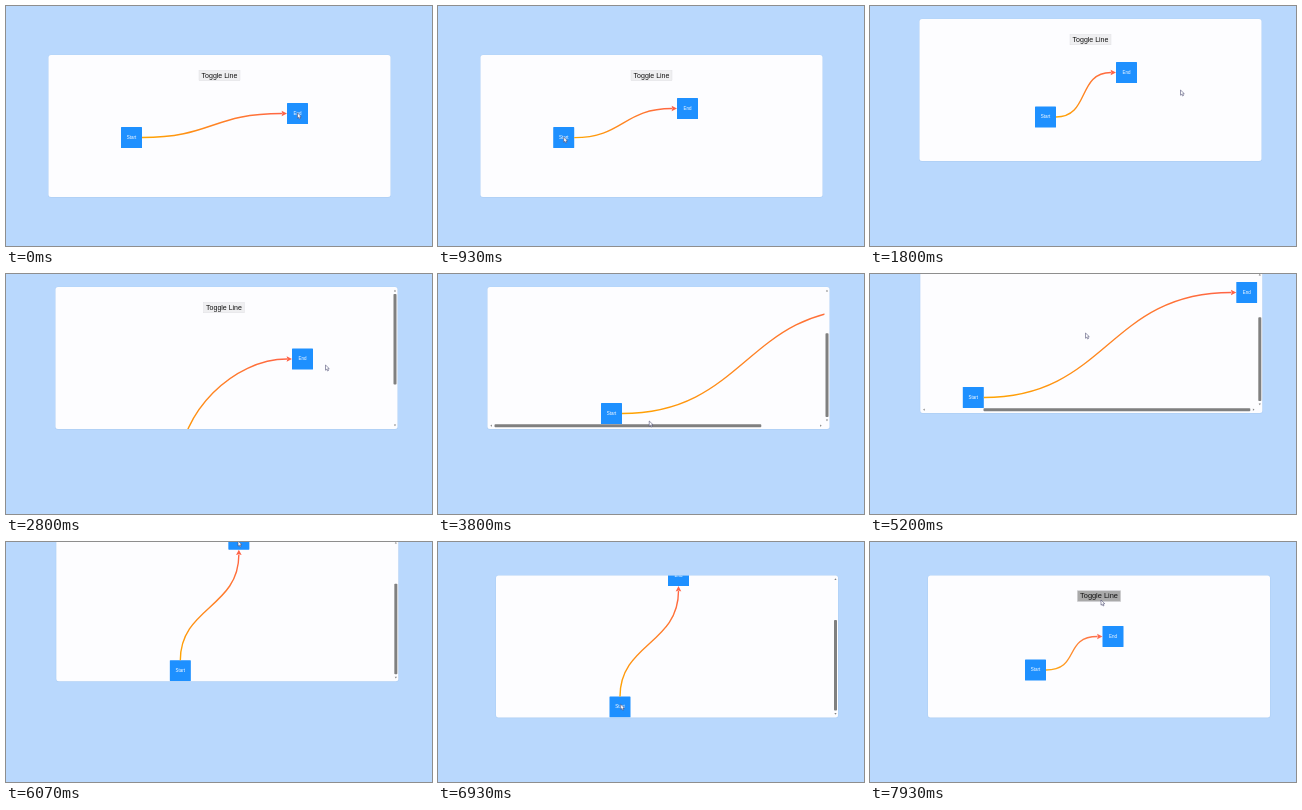
Animation of 426x240 px, one loop 8 s. Source, as an HTML page:

```html
<!DOCTYPE html>
<html lang="en">
<head>
<meta charset="utf-8">
<title>Toggle Line</title>
<style>
  html, body { margin: 0; width: 100%; height: 100%; overflow: hidden; background: #b9d8fd; }
  #stage { display: block; width: 100vw; height: 100vh; }
  text { font-family: "Liberation Sans", Arial, sans-serif; text-anchor: middle; }
  .label { font-size: 4.5px; fill: #fff; }
  .box { fill: #1e90ff; }
  .bar { fill: #808080; }
</style>
</head>
<body>
<svg id="stage" viewBox="0 0 426 240">
  <defs>
    <linearGradient id="fade" gradientUnits="userSpaceOnUse">
      <stop offset="0" stop-color="#ffa500"/>
      <stop offset="1" stop-color="#ff6347"/>
    </linearGradient>
  </defs>
  <g id="panel">
    <rect x="-.5" y="-.3" width="343" height="143" rx="3" fill="#a4c5ec" opacity=".5"/>
    <rect width="342" height="142" rx="2.5" fill="#fdfdff"/>
    <svg id="view">
      <g id="content">
        <g id="button">
          <rect x="-20.5" y="-5.2" width="41" height="10.4" stroke="#dcdce0" stroke-width=".4"/>
          <text y="2.2" font-size="7" fill="#111">Toggle Line</text>
        </g>
        <g id="start"><rect class="box" width="21" height="21" rx=".6"/><text class="label" x="10.5" y="11.8">Start</text></g>
        <g id="end"><rect class="box" width="21" height="21" rx=".6"/><text class="label" x="10.5" y="11.8">End</text></g>
        <g id="line">
          <path id="curve" fill="none" stroke="url(#fade)" stroke-width="1.4"/>
          <path id="arrow" d="M0 0L-5.4 -2.8L-4.6 0L-5.4 2.8Z" fill="#ff6347"/>
        </g>
      </g>
    </svg>
    <g id="vbar">
      <rect class="bar" x="338" width="3" rx=".8"/>
      <path class="bar" d="M338.4 4.4h2.2l-1.1-1.6z"/>
      <path class="bar tail" d="M338.4 -4.4h2.2l-1.1 1.6z"/>
    </g>
    <g id="hbar">
      <rect class="bar" y="137.2" height="3" rx=".8"/>
      <path class="bar" d="M4.4 137.6v2.2l-1.6-1.1z"/>
      <path class="bar tail" d="M-4.4 137.6v2.2l1.6-1.1z"/>
    </g>
  </g>
  <path id="cursor" d="M0 0V5.2L1.2 4.2L2 6L3 5.5L2.2 3.8L3.8 3.7Z" fill="#fff" stroke="#45456c" stroke-width=".55"/>
</svg>
<script>
const LOOP = 8000, FPS = 15, W = 342, H = 142, BAR = 5, SIZE = 21, HALF = SIZE / 2, ARROW = 5;
const $ = id => document.getElementById(id);

const initial = {
  panel: [42.5, 49], start: [72.5, 72], end: [238.5, 48],
  scrollX: [0], scrollY: [0], opacity: [1]
};

// Time, duration, what changes, and where it goes; "rest" only parks the pointer.
const script = [
  [0, 600, "end", 196.5, 43],
  [850, 400, "start", 115.5, 87.5],
  [1300, 400, "panel", 49.5, 13],
  [1800, 0, "rest", 310.5, 84],
  [1950, 300, "start", 113.5, 180],
  [2400, 250, "end", 236.5, 61.5],
  [2800, 0, "rest", 319.5, 91],
  [2900, 300, "end", 387, 75],
  [3350, 200, "scrollY", 1],
  [3800, 400, "scrollX", 1],
  [4400, 500, "panel", 50.3, -3],
  [5200, 0, "rest", 215.5, 59],
  [5450, 550, "end", 172, 48.5],
  [6050, 400, "panel", 58, 33.5],
  [6930, 400, "start", 97, 84],
  [7400, 150, "end", 174.5, 50.5],
  [7750, 0, "rest", 231, 58],
  [7830, 170, "opacity", .5]
].map(([at, span, what, ...to]) => ({ at, until: at + span, what, to }));
const pointing = script.filter(step => !["panel", "opacity"].includes(step.what));

function mix(a, b, k) {
  k = Math.min(1, Math.max(0, k));
  const ease = k * k * (3 - 2 * k);
  return a.map((v, i) => v + (b[i] - v) * ease);
}

function layout(t) {
  const s = { ...initial };
  for (const { at, until, what, to } of script)
    if (t > at && what in s) s[what] = mix(s[what], to, (t - at) / (until - at));
  s.fullW = Math.max(s.start[0], s.end[0]) + SIZE;
  s.fullH = Math.max(s.start[1], s.end[1]) + SIZE;
  const wide = s.fullW > W || (s.fullH > H && s.fullW > W - BAR);
  s.viewH = wide ? H - BAR : H;
  s.viewW = s.fullH > s.viewH ? W - BAR : W;
  s.x = s.scrollX[0] * Math.max(0, s.fullW - s.viewW);
  s.y = s.scrollY[0] * Math.max(0, s.fullH - s.viewH);
  return s;
}

const alongBar = (view, full, offset) => 7 + (view - 14) * offset / full;

function grip({ what, to }, t) {
  if (what === "rest") return to;
  const s = layout(t), [px, py] = s.panel;
  if (what === "scrollX") return [px + alongBar(s.viewW, s.fullW, s.x + s.viewW * .58), py + 134];
  if (what === "scrollY") return [px + 339.5, py + alongBar(s.viewH, s.fullH, s.y + s.viewH * .58)];
  return [px - s.x + s[what][0] + 10.5, py - s.y + s[what][1] + 10];
}

function pointer(t) {
  const next = pointing.find(step => step.at > t);
  const last = pointing.filter(step => step.at <= t).pop();
  if (t <= last.until || !next) return grip(last, t);
  return mix(grip(last, last.until), grip(next, next.at), (t - last.until) / (next.at - last.until));
}

const set = (node, attrs) => { for (const key in attrs) node.setAttribute(key, attrs[key]); };
const move = (id, x, y, extra = "") => set($(id), { transform: `translate(${x} ${y})${extra}` });

// Picks the nearest facing sides and joins them with a fluid curve.
function connect([sx, sy], [ex, ey]) {
  const dx = ex - sx, dy = ey - sy, ux = Math.sign(dx) || 1, uy = Math.sign(dy) || 1;
  const level = Math.abs(dx) > Math.abs(dy) + HALF, upright = Math.abs(dy) > Math.abs(dx) + HALF;
  const out = level ? [ux, 0] : [0, uy];
  const into = upright ? [0, uy] : [ux, 0];
  const from = [sx + HALF + out[0] * HALF, sy + HALF + out[1] * HALF];
  const tip = [ex + HALF - into[0] * HALF, ey + HALF - into[1] * HALF];
  const stop = tip.map((v, i) => v - into[i] * ARROW);
  const reach = axis => Math.max(34, Math.abs(stop[axis] - from[axis]) / 2);
  const r1 = reach(level ? 0 : 1), r2 = reach(upright ? 1 : 0);
  const c1 = from.map((v, i) => v + out[i] * r1);
  const c2 = stop.map((v, i) => v - into[i] * r2);
  set($("curve"), { d: `M${from}C${c1} ${c2} ${stop}` });
  set($("fade"), { x1: from[0], y1: from[1], x2: tip[0], y2: tip[1] });
  move("arrow", tip[0], tip[1], ` rotate(${Math.atan2(into[1], into[0]) * 180 / Math.PI})`);
}

function scrollbar(id, view, full, scroll, vertical) {
  const shown = full > view + .01, bar = $(id);
  set(bar, { visibility: shown ? "visible" : "hidden" });
  if (!shown) return;
  const at = alongBar(view, full, scroll), length = (view - 14) * view / full;
  set(bar.firstElementChild, vertical ? { y: at, height: length } : { x: at, width: length });
  set(bar.querySelector(".tail"), { transform: vertical ? `translate(0 ${view})` : `translate(${view} 0)` });
}

function draw(t) {
  const s = layout(t), [cx, cy] = pointer(t);
  move("panel", ...s.panel);
  set($("view"), { width: s.viewW, height: s.viewH });
  move("content", -s.x, -s.y);
  move("start", ...s.start);
  move("end", ...s.end);
  connect(s.start, s.end);
  set($("line"), { opacity: s.opacity[0] });
  scrollbar("vbar", s.viewH, s.fullH, s.y, true);
  scrollbar("hbar", s.viewW, s.fullW, s.x, false);

  const bx = s.viewW / 2, by = 20.6;
  const hover = Math.abs(cx - s.panel[0] + s.x - bx) < 21 && Math.abs(cy - s.panel[1] + s.y - by) < 5.5;
  move("button", bx, by, hover ? " scale(1.06)" : "");
  set($("button").firstElementChild, { fill: hover ? "#a9a9a9" : "#efeff1" });
  move("cursor", cx, cy);
}

const origin = performance.now();
function tick() {
  const elapsed = (performance.now() - origin) % LOOP;
  draw(Math.floor(elapsed * FPS / 1000 + 1e-6) * 1000 / FPS);
  requestAnimationFrame(tick);
}
tick();
</script>
</body>
</html>
```
